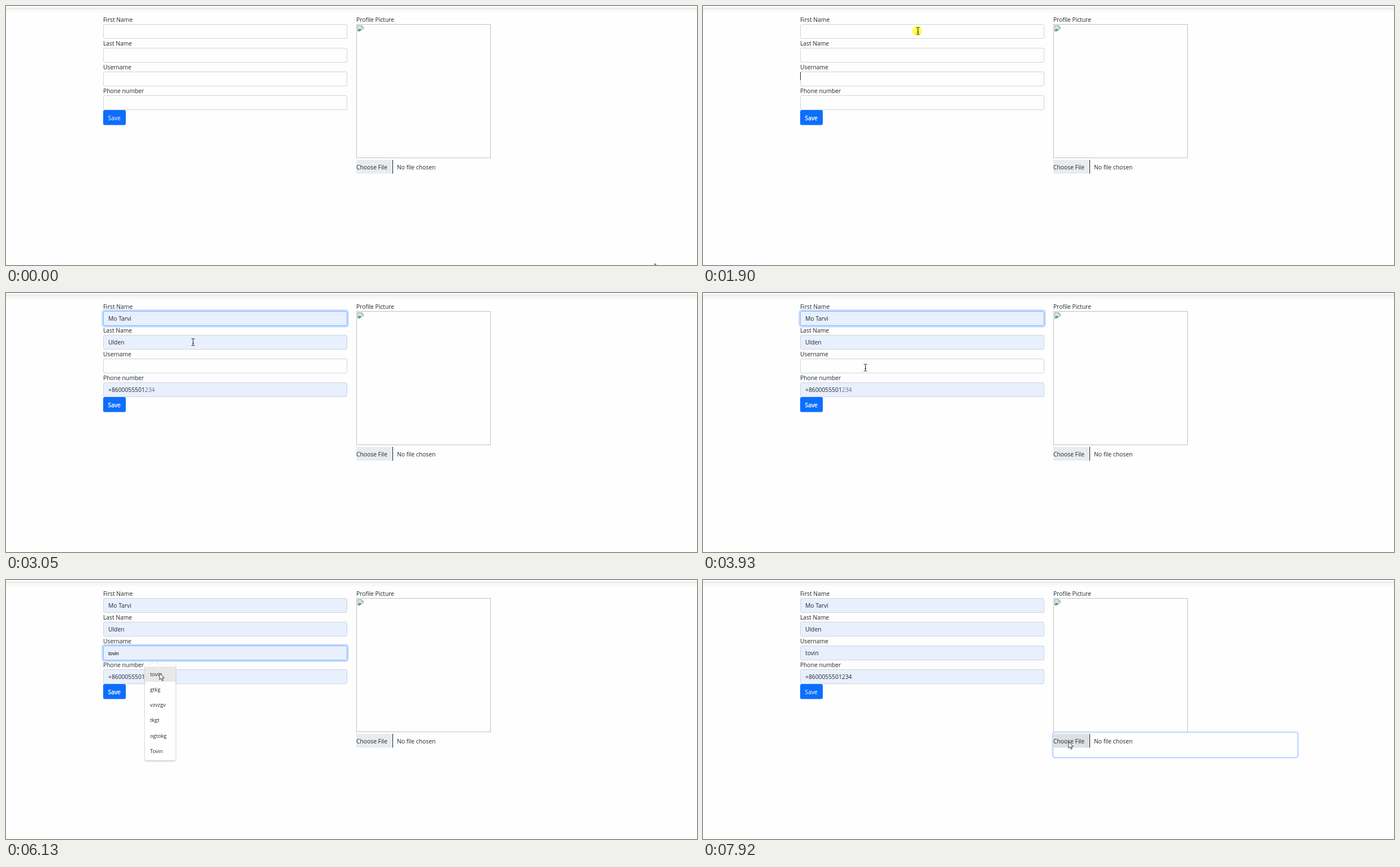
Animation, 1223 px wide and 458 px high, one loop 7990 ms. Source, as an HTML page:

```html
<!DOCTYPE html>
<html lang="en">
<head>
<meta charset="utf-8">
<title>Profile form</title>
<style>
html, body { margin: 0; width: 100%; height: 100%; overflow: hidden; background: #fefefe; }
svg { display: block; width: 1223px; height: 458px; font: 10.3px "Open Sans", "Noto Sans", sans-serif; }
text { fill: #212529; white-space: pre; }
.field { fill: #fefefe; stroke: #ced4da; }
.field.filled { fill: #e8f0fe; }
.field.focus { stroke: #86b7fe; }
.ring { fill: none; stroke: #c2dbfe; stroke-width: 2.7; }
.preview { font: 8.9px "Liberation Sans", Arial, sans-serif; fill: #000; }
.item { font-size: 9.25px; }
.small { font-size: 8.6px; }
.muted { fill: #5f6368; }
.menu { filter: drop-shadow(0 1px 1.5px rgba(0, 0, 0, .3)); }
.icon { fill: none; stroke: #5f6368; stroke-width: 1.1; }
.caret { stroke: #222; }
</style>
</head>
<body>
<svg id="stage" viewBox="0 0 1223 458"></svg>
<script>
const DURATION = 7990;
const FIELD_TOPS = [32, 74, 116, 158];
const LABELS = ["First Name", "Last Name", "Username", "Phone number"];
const PERSON = { first: "Mo Tarvi", last: "Ulden", user: "tovin", phone: "+8600055501234" };
const VALUES = [PERSON.first, PERSON.last, PERSON.user, PERSON.phone];
const SUGGESTIONS = [PERSON.user, "gtkg", "vzvzgv", "tkgt", "ogtokg", "Tovin"];

const text = (x, y, content, attrs = "") => `<text x="${x}" y="${y}" ${attrs}>${content}</text>`;
const rect = (x, y, w, h, attrs = "") => `<rect x="${x}" y="${y}" width="${w}" height="${h}" ${attrs}/>`;
const caret = (id, x, y) => `<path id="${id}" class="caret" d="M${x + .5} ${y}v16"/>`;

const field = (top, i) => `
  ${text(172, top - 4, LABELS[i])}
  <g id="ring${i}">${rect(170.65, top - 1.35, 434.7, 28.7, 'rx="4" class="ring"')}</g>
  ${rect(172.5, top + .5, 431, 25, `id="field${i}" rx="2.5" class="field"`)}
  ${text(181, top + 17, VALUES[i], `id="preview${i}" class="preview"`)}
  ${text(181, top + 17, i < 3 ? VALUES[i]
    : VALUES[i].slice(0, 11) + `<tspan id="tail">${VALUES[i].slice(11)}</tspan>`, `id="value${i}"`)}`;

const panel = (y, w, h) => `<path class="menu" fill="#fff"
  d="M248 ${y}h8l6.5 -7 6.5 7h${w - 25}q2 0 2 2v${h - 4}q0 2 -2 2h${4 - w}q-2 0 -2 -2v${4 - h}q0 -2 2 -2z"/>`;

const personIcon = y => `<g class="icon"><circle cx="261" cy="${y}" r="4.6"/>
  <circle cx="261" cy="${y - 1.2}" r="1.3"/><path d="M258 ${y + 3.2}q3 -2.6 6 0"/></g>`;

document.getElementById("stage").innerHTML = `
  <defs><linearGradient id="shade" x2="0" y2="1">
    <stop stop-color="#000" stop-opacity=".05"/><stop offset="1" stop-color="#000" stop-opacity="0"/>
  </linearGradient></defs>
  ${rect(0, 4, 1223, 9, 'fill="url(#shade)"')}
  ${rect(0, 3, 1223, 1, 'fill="#dee2e6"')}
  ${FIELD_TOPS.map(field).join("")}
  ${rect(172, 184, 40, 26.5, 'rx="2.7" fill="#0d6efd"')}
  ${text(180.5, 201.5, "Save", 'id="save" style="fill:#fff;stroke:#fff"')}

  ${text(620, 28, "Profile Picture")}
  ${rect(620.5, 32.5, 237, 236, 'fill="none" stroke="#c0c0c0"')}
  <path d="M622.5 34.5h7l3 3v3l-4 2 -2 2h-4z" fill="#d5e4f8" stroke="#a0a4a8"/>
  <path d="M623 43q3 -5 6 -1l-2 2h-4z" fill="#4fa84f"/>
  <path d="M629.5 34.5v3h3" fill="#fff" stroke="#888"/>
  <g id="fileRing">${rect(619, 269, 434, 45, 'rx="4" class="ring"')}</g>
  ${rect(620, 272, 64, 24.5, 'id="choose"')}
  ${rect(684, 272, 1, 24.5, 'fill="#212529"')}
  ${text(620, 288.5, "Choose File")}
  ${text(692, 288.5, "No file chosen")}

  <path id="strayCaret" class="caret" d="M172.5 117v14"/>
  ${caret("caretFirst", 181, 37)}
  ${caret("caretUser", 181, 121)}
  ${caret("caretUserEnd", 205, 121)}

  <g id="personMenu">
    ${panel(68, 218, 125)}
    ${rect(246, 68, 218, 43.5, 'id="hoverPerson" fill="#e8e8e8"')}
    ${personIcon(90)}${personIcon(133.5)}
    ${text(276, 85.5, PERSON.first, 'class="item"')}
    ${text(276, 101, PERSON.first + " " + PERSON.last, 'id="fullName" class="small"')}
    ${text(276, 129, "Nomme Avela", 'class="item"')}
    ${text(276, 145, "Nomme Avela Tesammar Kolhavintessa", 'class="small muted"')}
    ${rect(246, 158, 218, 1, 'fill="#dadce0"')}
    <circle cx="261" cy="176" r="5" fill="#5f6368"/>
    ${text(276, 179.5, "Manage...", 'class="item muted"')}
  </g>
  <g id="userMenu">
    ${panel(150, 54, 169)}
    ${rect(246, 153, 54, 27, 'id="hoverUser" fill="#e8e8e8"')}
    ${SUGGESTIONS.map((s, i) => text(255, 169.7 + i * 27.2, s, 'class="item"')).join("")}
  </g>

  <g id="pointer">
    <circle id="click" cx="-1.5" r="9" fill="#ffff5c"/>
    <path id="arrow" d="M.5 .5v11.5l2.7 -2.5 1.8 4.2 1.9 -.8 -1.8 -4h3.7z" fill="#fff" stroke="#222" stroke-width=".9"/>
    <path id="beam" d="M-3 -6h2.2q.8 0 .8 .8V5.2q0 .8 -.8 .8H-3M3 -6H.8q-.8 0 -.8 .8M3 6H.8q-.8 0 -.8 -.8M-1.5 2h3" fill="none" stroke="#222"/>
  </g>`;

const el = Object.fromEntries([...document.querySelectorAll("[id]")].map(node => [node.id, node]));
const show = (id, visible) => { el[id].style.display = visible ? "" : "none"; };

// Pointer path: time, x, y
const PATH = [
  [0, 1148, 455], [40, 1148, 455], [300, 900, 325], [600, 500, 115], [810, 394, 59], [940, 394, 59],
  [1210, 380.5, 44], [2250, 380.5, 44], [2500, 348.5, 74], [2710, 338, 80], [2920, 338, 80],
  [3300, 318, 100], [3880, 287.5, 132], [5620, 287.5, 132], [6000, 272, 164], [6410, 270, 165],
  [6600, 400, 128], [6800, 570, 105], [6930, 672, 122], [7020, 694.5, 148],
  [7230, 662, 284], [7500, 646.5, 285.5], [DURATION, 646.5, 285.5]
];

function pointerAt(t) {
  const i = PATH.findIndex(p => p[0] > t);
  const [t0, x0, y0] = PATH[i - 1], [t1, x1, y1] = PATH[i];
  const k = (t - t0) / (t1 - t0);
  return [x0 + (x1 - x0) * k, y0 + (y1 - y0) * k];
}

function render(t) {
  const during = (from, to = DURATION) => t >= from && t < to;
  const [x, y] = pointerAt(t);
  const personMenu = during(2030, 2920), userMenu = during(4140, 6410);
  const previewPerson = during(2400, 2920), previewUser = during(5840, 6410);
  const focused = during(1970, 4070) ? 0 : during(4070, 7850) ? 2 : -1;

  FIELD_TOPS.forEach((top, i) => {
    const isUser = i === 2;
    const preview = isUser ? previewUser : previewPerson;
    const done = during(isUser ? 6410 : 2920);
    show("ring" + i, focused === i);
    show("preview" + i, preview);
    show("value" + i, done);
    el["field" + i].classList.toggle("filled", preview || done);
    el["field" + i].classList.toggle("focus", focused === i);
  });
  el.tail.style.fill = t < 6410 ? "#6c7075" : "";
  el.save.style.strokeWidth = during(1900, 7780) ? .35 : 0;

  show("fileRing", during(7850));
  el.choose.style.fill = x < 684 && y > 272 && t > 7000 ? "#dde0e3" : "#e9ecef";

  show("strayCaret", during(1900, 1970));
  show("caretFirst", during(1970, 2400));
  show("caretUser", during(4080, 4610) || during(5140, 5670));
  show("caretUserEnd", during(6410, 6940) || during(7470, 7780));

  show("personMenu", personMenu);
  show("hoverPerson", previewPerson);
  el.fullName.classList.toggle("muted", !previewPerson);
  show("userMenu", userMenu);
  show("hoverUser", previewUser);

  const overField = x > 172 && x < 604 && FIELD_TOPS.some(top => y >= top && y < top + 26);
  const overMenu = personMenu && y > 66 || userMenu && y > 148;
  const beam = overField && !overMenu;
  show("beam", beam);
  show("arrow", !beam);
  show("click", [1900, 2850, 4000, 6340, 7780].some(c => during(c, c + 70)));
  el.pointer.setAttribute("transform", `translate(${x} ${y})`);
}

const start = performance.now();
function tick() {
  render((performance.now() - start) % DURATION);
  requestAnimationFrame(tick);
}
tick();
</script>
</body>
</html>
```
